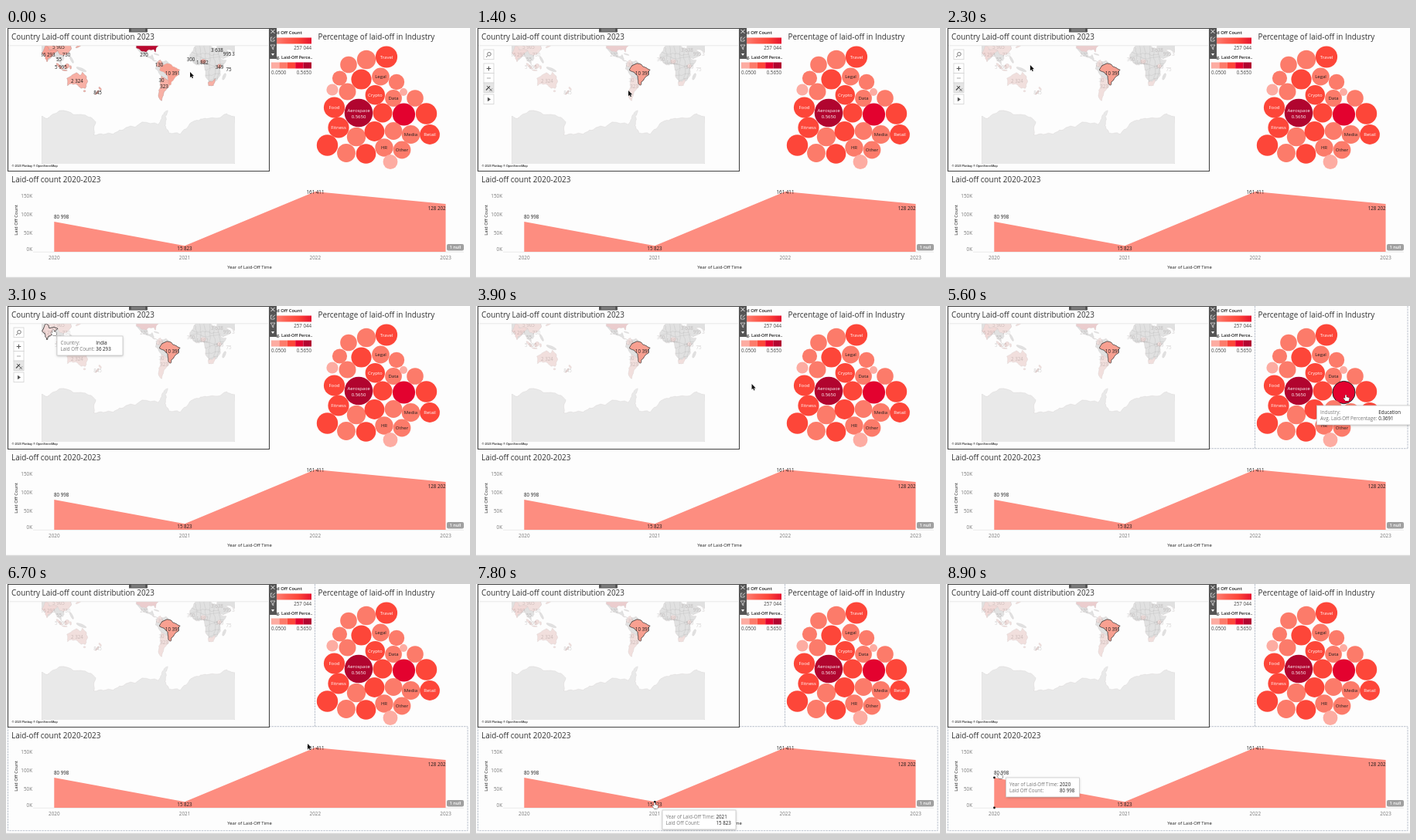
Write an HTML page with a canvas that moves like this. It is 600x324 px and loops after 9 s.

```html
<!DOCTYPE html>
<html lang="en">
<head>
<meta charset="utf-8">
<title>Laid-off dashboard</title>
<style>
html, body { margin: 0; width: 600px; height: 324px; overflow: hidden; background: #fdfdfd; }
canvas { display: block; width: 600px; height: 324px; }
</style>
</head>
<body>
<canvas id="stage"></canvas>
<script>
const LOOP = 9000, STEP = 100;
const canvas = document.getElementById('stage');
const c = canvas.getContext('2d');
const dpr = window.devicePixelRatio || 1;
canvas.width = 600 * dpr;
canvas.height = 324 * dpr;

const SCALE = ['#fdaca2', '#fc7b6a', '#fd4639', '#e3022f', '#b1052f'];
const INK = '#1c1c1c', GREY = '#777', FONT = '"Open Sans", "Noto Sans", sans-serif';

function rect(x, y, w, h, fill) {
  c.fillStyle = fill;
  c.fillRect(x, y, w, h);
}
function line(points, color, width = 1, dash = []) {
  c.beginPath();
  for (let i = 0; i < points.length; i += 2) c.lineTo(points[i], points[i + 1]);
  c.strokeStyle = color;
  c.lineWidth = width;
  c.setLineDash(dash);
  c.stroke();
  c.setLineDash([]);
}
function triangle(points, fill) {
  c.beginPath();
  for (let i = 0; i < 6; i += 2) c.lineTo(points[i], points[i + 1]);
  c.fillStyle = fill;
  c.fill();
}
function disc(x, y, r, fill) {
  c.beginPath();
  c.arc(x, y, r, 0, 7);
  c.fillStyle = fill;
  c.fill();
}
function ring(x, y, r, color) {
  c.beginPath();
  c.arc(x, y, r, 0, 7);
  c.strokeStyle = color;
  c.lineWidth = 1;
  c.stroke();
}
function text(s, x, y, size = 6.2, color = INK, align = 'left', weight = 400) {
  c.font = `${weight} ${size}px ${FONT}`;
  c.textAlign = align;
  c.fillStyle = color;
  c.fillText(s, x, y);
}

// ---- pointer stops: arrival, departure, place, and the mark hovered there ----
const stops = [
  { from: 0, to: 300, x: 238, y: 57 },
  { from: 700, to: 1000, x: 212, y: 62 },
  { from: 1400, to: 1700, x: 197, y: 81 },
  { from: 2700, to: 3300, x: 61, y: 30, mark: 'India', box: [66, 39, 85],
    rows: ['Country:', 'India', 'Laid Off Count:', '36 293'] },
  { from: 4200, to: 4700, x: 460, y: 126, mark: 'Aerospace', box: [469.5, 135.5, 124],
    rows: ['Industry:', 'Aerospace', 'Avg. Laid-Off Percentage:', '0.5650'] },
  { from: 5000, to: 5800, x: 517, y: 115, mark: 'Education', box: [479.5, 129, 121],
    rows: ['Industry:', 'Education', 'Avg. Laid-Off Percentage:', '0.3691'] },
  { from: 6700, to: 6900, x: 390, y: 207 },
  { from: 7500, to: 8000, x: 231, y: 283, mark: 2021, box: [241, 293, 95],
    rows: ['Year of Laid-Off Time:', '2021', 'Laid Off Count:', '15 823'] },
  { from: 8500, to: LOOP, x: 69, y: 244, mark: 2020, box: [77.5, 251, 95],
    rows: ['Year of Laid-Off Time:', '2020', 'Laid Off Count:', '80 998'] }
];
function pointerAt(t) {
  const i = stops.findLastIndex(s => s.from <= t), a = stops[i];
  if (t <= a.to) return a;
  const b = stops[i + 1], u = (t - a.to) / (b.from - a.to), e = u * u * (3 - 2 * u);
  return { x: a.x + (b.x - a.x) * e, y: a.y + (b.y - a.y) * e };
}

// ---- map: Mercator, cut at 67 degrees east, coasts roughened between key points ----
const mapX = lon => 46 + ((lon < 67 ? lon + 360 : lon) - 67) * 250 / 360;
const mapY = lat => 49.5 - 125 / Math.PI * Math.log(Math.tan(Math.PI / 4 + lat * Math.PI / 360));

// the same edge gets the same bend whichever way it is walked
function rough(a, b, depth, out) {
  if (depth) {
    const [p, q] = a[0] < b[0] ? [a, b] : [b, a];
    const h = Math.sin((a[0] + b[0]) * 12.99 + (a[1] + b[1]) * 78.23) * 43758;
    const k = (h - Math.floor(h) - .5) * .3;
    const mid = [(a[0] + b[0]) / 2 + (q[1] - p[1]) * k, (a[1] + b[1]) / 2 - (q[0] - p[0]) * k];
    rough(a, mid, depth - 1, out);
    rough(mid, b, depth - 1, out);
  } else out.lineTo(...b);
}
function coast(coords, closed = true) {
  const pts = [], path = new Path2D();
  for (let i = 0; i < coords.length; i += 2) pts.push([mapX(coords[i]), mapY(coords[i + 1])]);
  path.moveTo(...pts[0]);
  for (let i = 1; i < pts.length; i++) rough(pts[i - 1], pts[i], 3, path);
  if (closed) path.closePath();
  return path;
}
const lands = [];
function add(path, fill = '#e1e1e1', faded = fill) {
  lands.push({ path, fill, faded, edge: fill === faded ? 'rgba(180,180,180,.5)' : 'rgba(130,95,95,.6)' });
  return path;
}
const PINK = ['#f8b0a5', '#f1dfdd'];
const land = (coords, ...colors) => add(coast(coords), ...colors);
function isle(lon, lat, length, width, tilt, ...colors) {
  const path = new Path2D(), s = 250 / 720;
  path.ellipse(mapX(lon), mapY(lat), length * s, width * s, tilt, 0, 7);
  add(path, ...colors);
}

land([67,-67.8, 78,-69.5, 88,-66.3, 140,-66.5, 168,-71.5, 164,-77.8, 200,-77.5, 225,-74.5, 285,-73, 291,-68, 302,-63.3,
  298,-72, 304,-77, 325,-77.5, 345,-72, 375,-69.5, 412,-66, 427,-68, 427,-85.2, 67,-85.2], '#e9e9e9');
land([67,40, 67,25, 77,10, 90,22, 98,9, 104,2, 102,12, 106,10, 109,14, 108,21, 122,30, 122,40]);
land([74,40, 79,31, 97,28, 101,21, 114,22, 122,30, 120,40], ...PINK);
const india = land([68,24, 73,20, 77,8, 80,15, 89,22, 97,28, 81,29, 79,34, 74,36, 70,27], '#f89f93', '#f1d9d7');
land([114,-22, 115,-34, 131,-31.5, 140,-38, 149,-38, 153,-27, 143,-11, 139,-17, 131,-12, 122,-18], ...PINK);
isle(100, 0, 15, 4, .8, ...PINK);
isle(110, -7.5, 10, 2, .1, ...PINK);
isle(114, 0, 10, 8, -.8, ...PINK);
isle(121, -2, 7, 3, 1.5, ...PINK);
isle(141, -6, 20, 5, .4);
isle(123, 12, 14, 4, 1.1);
isle(136, 35, 12, 3, -.5, ...PINK);
isle(147, -42, 4, 3, 0, ...PINK);
isle(176, -38.5, 7, 3, .9, ...PINK);
isle(170.5, -44, 10, 3, -.9, ...PINK);
land([-117,32.5, -97,26, -97,20, -91,18, -87,21, -84,11, -77,8, -85,10, -94,16, -105,20]);
land([-124,42, -117,32.5, -97,26, -94,29.5, -84,30, -81,25.5, -76,35, -74,42], '#b9082f', '#ebcdce');
isle(-79, 21.5, 10, 2, .3);
land([-77,8, -62,10.5, -50,0, -58,-34, -70,-18, -81,-5]);
land([-77,8, -72,12, -67,4, -70,-4, -79,1], ...PINK);
land([-70,-18, -63,-22, -55,-27, -57,-37, -65,-43, -69,-54, -75,-50, -72,-30], ...PINK);
const africa = land([-17,21, -6,36, 10,37, 32,31, 43,12, 51,11, 40,-4, 40,-15, 33,-26, 20,-34.5, 12,-17, 9,4, -8,4.5, -17,14]);
isle(8, 9, 10, 8, 0, ...PINK);
isle(38, 0, 7, 8, 0, ...PINK);
land([17,-29, 31,-22.5, 27,-34, 18,-34.5], ...PINK);
isle(47, -19, 13, 5, -1.2);
land([35,40, 35,28, 45,13, 60,22, 50,29, 66.9,25, 66.9,40]);
const brazil = land([-60,5, -51,3, -44,-2.5, -35,-7, -39,-17, -48,-26, -53,-33.5, -57,-30, -58,-20, -65,-11, -73,-8,
  -69,1], '#f8a091');

const borders = [];
for (let i = 0; i < 6; i++) {
  borders.push(coast([-8 + 9 * i, 37, -6 + 9 * i, 10, -8 + 9 * i, -30], false));
  borders.push(coast([-17, 27 - 10 * i, 15, 23 - 10 * i, 50, 25 - 10 * i], false));
}

const mapLabels = [['5 905', 68, 27], ['36 293', 54, 36.5], ['730', 78, 36.5], ['55', 68.5, 43], ['5 995', 71, 52.5],
  ['2 324', 92, 71], ['845', 118.5, 86], ['270', 178.5, 36.5], ['130', 198, 50], ['30', 201, 69.5], ['323', 204.5, 78],
  ['300', 239, 43], ['1 882', 254, 46.5], ['349', 276, 52.5], ['3 638', 273, 30.5], ['995', 286, 36], ['3', 294, 36],
  ['75', 288, 56]];

function drawMap(t, mark) {
  const picked = t >= 800;
  const outline = (path, color, width) => {
    c.strokeStyle = color;
    c.lineWidth = width;
    c.stroke(path);
  };
  c.save();
  c.beginPath();
  c.rect(46, 23, 250, 153);
  c.clip();
  c.lineJoin = 'round';
  for (const l of lands) {
    c.fillStyle = picked ? l.faded : l.fill;
    c.fill(l.path);
    outline(l.path, picked ? 'rgba(190,180,180,.5)' : l.edge, .4);
    if (l.path === africa) {
      c.save();
      c.clip(africa);
      for (const b of borders) outline(b, 'rgba(165,165,165,.6)', .4);
      c.restore();
    }
  }
  for (const [s, x, y] of mapLabels) text(s, x, y, 6.2, picked ? 'rgba(90,80,80,.25)' : INK, 'center');
  if (picked) outline(brazil, '#222', .7);
  if (mark === 'India') outline(india, '#222', .8);
  text('10 391', 215.5, 61.3, 6.2, INK, 'center');
  c.restore();
  text('© 2023 Plotbay © OpenStreetMap', 7.5, 180, 3.65, INK, 'left', 600);
  if (t >= 300 && t < 3700) drawTools();
}

function drawTools() {
  for (const y of [28, 46, 58.5, 71, 86]) {
    rect(10, y, 13, 12.7, y === 71 ? '#e6e6e6' : '#fff');
    c.strokeStyle = '#d2d2d2';
    c.lineWidth = .8;
    c.strokeRect(10, y, 13, 12.7);
  }
  ring(17, 33.8, 2.3, '#777');
  line([15.3, 35.5, 13, 38], '#777');
  line([13.7, 52.5, 19.3, 52.5], '#555');
  line([16.5, 49.7, 16.5, 55.3], '#555');
  line([14, 65, 19, 65], '#aaa');
  line([13, 80.5, 18, 75.5], '#555', 1.5);
  line([14, 75, 18.5, 79.5], '#555');
  line([17.5, 78.5, 21, 82], '#555', .8);
  line([21, 78.5, 17.5, 82], '#555', .8);
  triangle([15, 89.7, 19, 92.5, 15, 95.3], '#555');
}

// ---- legends and the dark side bar ----
function drawLegends() {
  text('d Off Count', 350, 8, 5.9, INK, 'left', 600);
  const g = c.createLinearGradient(343, 0, 395, 0);
  ['#fd9184', '#fd6457', '#fd4639', '#e6122f'].forEach((s, i) => g.addColorStop(i / 3, s));
  rect(343, 12.5, 52, 8, g);
  text('257 044', 395, 28, 6.2, '#444', 'right');
  text('g. Laid-Off Perce..', 350, 39.7, 5.5, INK, 'left', 600);
  SCALE.forEach((s, i) => rect(343 + i * 10.4, 44.5, 10.4, 8, s));
  text('0.0500', 343, 59.6, 6.2, '#444');
  text('0.5650', 395, 59.6, 6.2, '#444', 'right');
}
function drawSideBar() {
  rect(340, 0, 10, 40, '#555');
  line([342.5, 2, 347.5, 7], '#fff', .9);
  line([347.5, 2, 342.5, 7], '#fff', .9);
  line([344.5, 12, 342.5, 12, 342.5, 17, 347, 17, 347, 15], '#ddd', .8);
  line([344.5, 15, 348, 11.5], '#fff', .8);
  line([342, 22, 348, 22, 345.7, 25, 345.7, 28, 344.3, 27, 344.3, 25, 342, 22], '#ddd', .8);
  triangle([343, 33, 347, 33, 345, 36], '#fff');
  rect(159, 0, 24, 5.5, '#555');
  line([162, 1.7, 180, 1.7], '#ccc', .6);
  line([162, 3.7, 180, 3.7], '#ccc', .6);
}

// ---- bubbles: x, y, radius, label; the radius stands for the value and so sets the colour ----
const bubbles = [
  [466, 41, 12.4], [443, 47.5, 11], [492, 37.5, 14.3, 'Travel'], [484.5, 63, 11.6, 'Legal'], [459.5, 66.5, 13.3],
  [431.5, 65, 9.8], [505, 70, 10.4], [422, 80, 7.8], [441.5, 82.5, 11.2], [477.3, 86.8, 12.9, 'Crypto'],
  [501, 91, 11.1, 'Data'], [514, 83, 5.2], [529, 91, 11], [424.5, 103, 13.8, 'Food'], [456, 110, 18.5, 'Aerospace'],
  [487, 110, 12.7], [514.5, 112, 14.8], [543.5, 111, 13.9], [430, 129, 13.8, 'Fitness'], [453, 141, 12.4],
  [476.5, 134, 13.1], [501, 133.5, 11.6], [523.5, 138, 12.1, 'Media'], [548, 138, 13.1, 'Retail'], [415.5, 152, 13.9],
  [440, 162, 12.1], [465.5, 163, 13], [489, 155, 11.9, 'HR'], [512, 158, 11.6, 'Other'], [497, 173.5, 9.6]
];
const level = r => [9.7, 12.6, 14.6, 17].filter(limit => r > limit).length;

function drawBubbles(mark) {
  for (const [x, y, r, label] of bubbles) {
    const n = level(r), ink = n > 1 ? '#fff' : INK;
    disc(x, y, r - .2, SCALE[n]);
    if (n === 4 && mark === 'Aerospace' || n === 3 && mark === 'Education') ring(x, y, r - .2, '#222');
    if (!label) continue;
    text(label, x, n === 4 ? y - 1.4 : y + 2.2, 6, ink, 'center');
    if (n === 4) text('0.5650', x, y + 6.6, 6, ink, 'center');
  }
}

// ---- area chart ----
const counts = [80998, 15823, 161411, 128202];
const yearX = i => 62.3 + i * 168.75;
const valueY = v => 290 - v * 0.000483;

function drawArea(mark) {
  line([35, 290.3, 592, 290.3], '#e2e2e2', .7);
  c.beginPath();
  c.moveTo(yearX(0), 290);
  counts.forEach((v, i) => c.lineTo(yearX(i), valueY(v)));
  c.lineTo(yearX(3), 290);
  c.fillStyle = '#fd8d80';
  c.fill();
  for (let k = 0; k <= 150; k += 50) text(k + 'K', 34, Math.min(valueY(k * 1000) + 2, 288.5), 6.3, GREY, 'right');
  counts.forEach((v, i) => text(2020 + i, yearX(i), 300.3, 6.3, GREY, 'center'));
  text('Year of Laid-Off Time', 315, 312, 5.9, INK, 'center');
  c.save();
  c.translate(15, 249);
  c.rotate(-Math.PI / 2);
  text('Laid Off Count', 0, 0, 5.9, INK, 'center');
  c.restore();
  text('80 998', 62, 247, 6.2);
  text('15 823', 231, 288, 6.2, INK, 'center');
  text('161 411', 400, 215.3, 6.2, INK, 'center');
  text('128 202', 568.5, 236, 6.2, INK, 'right');
  c.beginPath();
  c.roundRect(570, 280, 22, 8.5, 2);
  c.fillStyle = '#a0a0a0';
  c.fill();
  text('1 null', 581, 286.3, 5.6, '#fff', 'center', 600);
  if (mark >= 2020) {
    const i = mark - 2020;
    disc(yearX(i) + .2, valueY(counts[i]), 1.4, '#111');
    disc(yearX(i) + .2, 290, 1.4, '#111');
  }
}

// ---- panel frames, shown as the pointer enters them ----
function drawPanels(t) {
  const dashed = points => line(points, '#a9b1bf', .8, [2.5, 1]);
  line([3, 22.8, 339, 22.8], '#e0e0e0', .7);
  line([0, 323.3, 600, 323.3], '#cfcfcf', 1);
  if (t >= 4000) {
    dashed([399.5, 0, 399.5, 185]);
    dashed([340, 184.7, 597, 184.7]);
    if (t < 6400) dashed([597, 0, 597, 185]);
  }
  if (t >= 6400) dashed([2.5, 185, 2.5, 319.7, 597, 319.7, 597, 184.7]);
  line([2.5, 0, 2.5, 185.5, 340.5, 185.5, 340.5, .5, 2.5, .5], '#444', 1.1);
}

function drawTip({ box, rows }) {
  const [x, y, w] = box;
  c.save();
  c.shadowColor = 'rgba(0,0,0,.25)';
  c.shadowBlur = 3 * dpr;
  c.shadowOffsetY = dpr;
  rect(x, y, w, 25, '#fff');
  c.restore();
  c.strokeStyle = '#c4c4c4';
  c.lineWidth = .7;
  c.strokeRect(x, y, w, 25);
  c.font = `400 6.3px ${FONT}`;
  const col = x + 6.3 + Math.max(c.measureText(rows[0]).width, c.measureText(rows[2]).width);
  for (const i of [0, 2]) {
    const base = y + 10.8 + i * 4.2;
    text(rows[i], x + 4.5, base, 6.3, GREY);
    text(rows[i + 1], col, base, 6.2, INK, 'left', 500);
  }
}

const arrow = new Path2D('M0 0V7.2L1.7 5.7 2.8 8.3 4 7.8 2.9 5.3H5.2Z');
const hand = new Path2D('M-.8 .8Q0 -.6 .8 .8V3L4 3.8Q4.8 4.2 4.5 5.2L3.7 8H-.5L-2.9 4.9Q-2.9 3.8 -1.9 4.1L-.8 5Z');

function drawPointer({ x, y, mark }) {
  c.save();
  c.translate(x, y);
  c.lineWidth = .8;
  c.strokeStyle = mark ? '#111' : '#fff';
  c.fillStyle = mark ? '#fff' : '#111';
  c.stroke(mark ? hand : arrow);
  c.fill(mark ? hand : arrow);
  c.restore();
}

function draw(t) {
  const pointer = pointerAt(t), { mark } = pointer;
  c.setTransform(dpr, 0, 0, dpr, 0, 0);
  rect(0, 0, 600, 324, '#fdfdfd');
  drawMap(t, mark);
  drawLegends();
  drawBubbles(mark);
  drawArea(mark);
  drawPanels(t);
  drawSideBar();
  text('Country Laid-off count distribution 2023', 7, 15.4, 9.92, '#333');
  text('Percentage of laid-off in Industry', 403.5, 15.4, 9.92, '#333');
  text('Laid-off count 2020-2023', 7, 199.5, 9.95, '#333');
  if (mark) drawTip(pointer);
  drawPointer(pointer);
}

const start = performance.now();
function tick() {
  const t = (performance.now() - start) % LOOP;
  draw(Math.floor(t / STEP) * STEP);
  requestAnimationFrame(tick);
}
tick();
</script>
</body>
</html>
```
